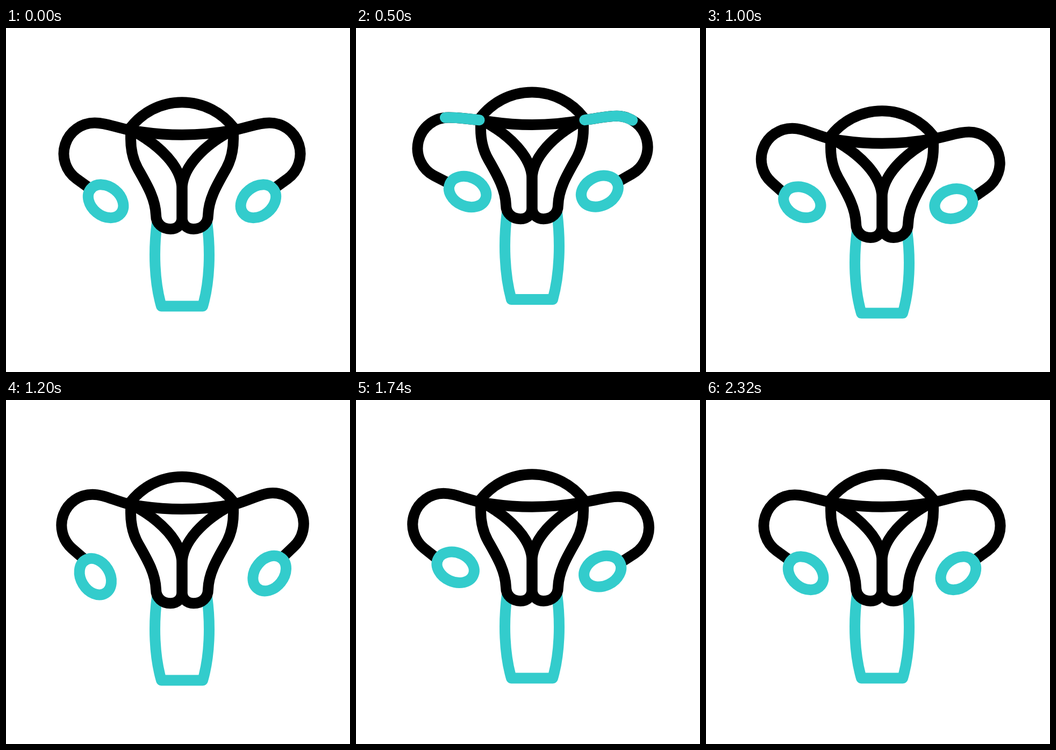
Recreate the animation shown at these times as an HTML page. Size 640 px wide and 640 px high, loop 3600 ms.

```html
<!DOCTYPE html>
<html lang="en">
<head>
<meta charset="utf-8">
<style>
  html, body { margin: 0; height: 100%; overflow: hidden; background: #fff; }
  svg { display: block; width: 100%; height: 100%; }
  .line { fill: none; stroke: #000; stroke-width: 20; stroke-linecap: round; stroke-linejoin: round; }
  .teal { stroke: #33cccc; }
</style>
</head>
<body>
<svg viewBox="0 0 640 640">
  <defs>
    <path id="half" d="M232 189V206C232 232 238 249 246 263C262.5 292 278 318 279 348C279 364 291 374 306 374C318 374 327.5 366 327.5 352V300C327.5 259 286 218 237 192"/>
  </defs>
  <path id="canal" class="line teal"/>
  <g id="arms"></g>
  <g id="womb" class="line">
    <path d="M232 185A121 121 0 0 1 423 185M232 190Q327.5 207.5 423 190"/>
    <use href="#half"/>
    <use href="#half" transform="matrix(-1 0 0 1 655 0)"/>
  </g>
  <g id="dashes"></g>
</svg>
<script>
const LOOP = 3600, REST = 2320, MIRROR = 'matrix(-1 0 0 1 655 0)';
const R = 57.5, REACH = 66, LONG = 36, SHORT = 27, RAD = Math.PI / 180;
const $ = id => document.getElementById(id);

// turning points of each damped swing: time, value
const BODY = [[100, 0], [680, -24], [1000, 16], [1370, -4.5], [1650, 0]];
const FOOT = [[100, 0], [560, -13], [1000, 13], [1350, -1.5], [1650, 0]];
const SWAY = [[250, 0], [660, 13], [1090, -8], [1450, 5], [1780, -3], [2100, 0]];

const clamp = u => Math.min(1, Math.max(0, u));
const ease = u => (1 - Math.cos(Math.PI * clamp(u))) / 2;

function swing(turns, t) {
  let value = turns[0][1];
  for (let i = 1; i < turns.length; i++) {
    const [t0, v0] = turns[i - 1], [t1, v1] = turns[i];
    value += (v1 - v0) * ease((t - t0) / (t1 - t0));
  }
  return value;
}

function set(el, attrs) {
  for (const k in attrs) el.setAttribute(k, attrs[k]);
}
function add(parent, tag, attrs) {
  const el = document.createElementNS('http://www.w3.org/2000/svg', tag);
  set(el, attrs);
  return parent.appendChild(el);
}

// tubeLag and tipLag stretch the sway in time, so the ovary trails its tube
function makeArm(transform, tubeLag, tipLag, dashStart) {
  const group = add($('arms'), 'g', { transform });
  const tube = add(group, 'path', { class: 'line' });
  const ovary = add(group, 'ellipse', { class: 'line teal', rx: LONG, ry: SHORT });
  const dash = add($('dashes'), 'path', { class: 'line teal', transform, pathLength: 1 });

  return (t, shift) => {
    const fade = clamp((REST - t) / 300);
    const sway = fade * swing(SWAY, t / tubeLag);
    const tilt = 39 - 3 * fade * swing(SWAY, t / tipLag);

    const cx = 165 + 0.8 * sway, cy = 234 + shift + sway;
    const out = (96.4 - sway) * RAD;
    const ex = cx + REACH * Math.cos(out), ey = cy + REACH * Math.sin(out);
    // the tube leaves its round bend along the tangent to the ovary's tip
    const leave = out + Math.acos(R / REACH);
    const jx = 230, jy = 190 + shift, top = cy - R;
    const d = `M${jx} ${jy}C${jx + (cx - jx) * 0.45} ${jy + (top - jy) * 0.45} ${cx + 20} ${top} ${cx} ${top}`
      + `A${R} ${R} 0 0 0 ${cx + R * Math.cos(leave)} ${cy + R * Math.sin(leave)}L${ex} ${ey}`;
    set(tube, { d });
    set(ovary, { transform: `translate(${ex} ${ey}) rotate(${tilt}) translate(${LONG} 0)` });

    const head = ease((t - dashStart) / 425), tail = ease((t - 490) / 425);
    set(dash, {
      d,
      display: head > 0 && tail < 1 ? 'inline' : 'none',
      'stroke-dasharray': `${head - tail} 3`,
      'stroke-dashoffset': -tail
    });
  };
}

const arms = [makeArm('', 1, 1.18, 355), makeArm(MIRROR, 1.12, 1.24, 323)];

function draw() {
  const t = performance.now() % LOOP;
  const shift = swing(BODY, t);
  const y0 = 362 + shift, y1 = 517.5 + swing(FOOT, t);
  const ya = y0 + (y1 - y0) * 0.34, yb = y0 + (y1 - y0) * 0.71;
  set($('canal'), {
    d: `M281 ${y0}C274 ${ya} 276 ${yb} 289 ${y1}H366C379 ${yb} 381 ${ya} 374 ${y0}`
  });
  set($('womb'), { transform: `translate(0 ${shift})` });
  arms.forEach(arm => arm(t, shift));
  requestAnimationFrame(draw);
}
draw();
</script>
</body>
</html>
```
